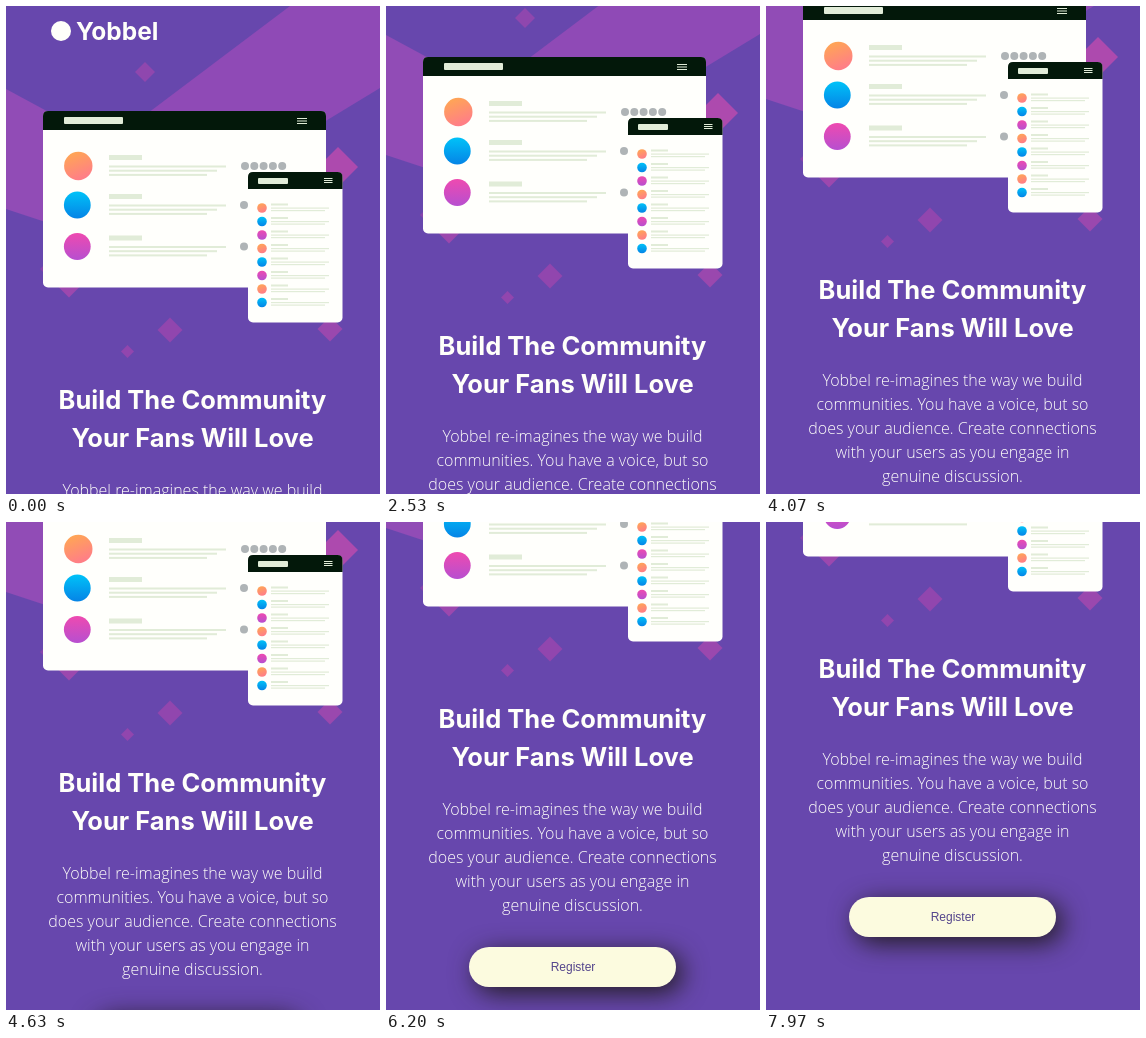
These frames come from a looping animation (374x488 px, 8 s). An HTML page:

```html
<!DOCTYPE html>
<html lang="en">
<head>
<meta charset="utf-8">
<title>Landing page scroll</title>
<style>
  html, body { margin: 0; width: 100%; height: 100%; overflow: hidden; background: #6747ad; }
  svg { display: block; }
  text { fill: #fffffa; }
  .logo { font: 700 24.5px Inter, sans-serif; }
  .heading { font: 700 25.5px Inter, sans-serif; text-anchor: middle; }
  .copy { font: 300 16px "Open Sans", sans-serif; text-anchor: middle; }
  .label { font: 12px "Liberation Sans", Arial, sans-serif; text-anchor: middle; fill: #54458c; }
  .button { fill: #fcfbdf; filter: drop-shadow(6px 6px 13px rgba(30, 25, 24, .95)); }
  .paper { fill: #fffffc; }
  .dark { fill: #03180a; }
  .pale { fill: #e1ecd8; }
  .dot { fill: #afb4b6; }
</style>
</head>
<body>
<svg width="374" height="488" viewBox="0 0 374 488">
  <defs>
    <linearGradient id="orange" x2=".4" y2="1"><stop stop-color="#ffab4e"/><stop offset="1" stop-color="#ff7f86"/></linearGradient>
    <linearGradient id="blue" x2="0" y2="1"><stop stop-color="#00c2f8"/><stop offset="1" stop-color="#0584e6"/></linearGradient>
    <linearGradient id="pink" x2="0" y2="1"><stop stop-color="#ee4ab0"/><stop offset="1" stop-color="#b74fd0"/></linearGradient>
  </defs>
  <g id="page"></g>
</svg>
<script>
const page = document.getElementById('page');
const colors = ['orange', 'blue', 'pink'];

const rect = (cls, x, y, w, h, r = 0) =>
  `<rect class="${cls}" x="${x}" y="${y}" width="${w}" height="${h}" rx="${r}"/>`;
const circle = (fill, x, y, r) => `<circle fill="${fill}" cx="${x}" cy="${y}" r="${r}"/>`;
const text = (cls, x, y, str) => `<text class="${cls}" x="${x}" y="${y}">${str}</text>`;
const diamond = ([x, y, r, fill]) =>
  `<path fill="${fill}" d="M${x} ${y - r}l${r} ${r}l${-r} ${r}l${-r} ${-r}z"/>`;
const lines = (cls, x, y, step, str) =>
  str.map((s, i) => text(cls, x, y + i * step, s)).join('');
const menu = (x, y, w, step) => [0, 1, 2].map(i => rect('pale', x, y + i * step, w, 1)).join('');

const frame = (x, y, w, h, head) =>
  rect('paper', x, y, w, h, 5) +
  `<path class="dark" d="M${x} ${y + head}v${5 - head}q0 -5 5 -5h${w - 10}q5 0 5 5v${head - 5}z"/>`;

const largeRow = (y, i) =>
  circle(`url(#${colors[i]})`, i ? 71.3 : 72.3, y, i ? 13.4 : 14.2) +
  rect('pale', 103, y - 11, 33, 5) +
  [117, 108, 98].map((w, k) => rect('pale', 103, y - .5 + k * 4.2, w, 2)).join('') +
  [0, 1, 2, 3, 4].slice(0, i ? 1 : 5)
    .map(k => `<circle class="dot" cx="${(i ? 238 : 239) + k * 9.3}" cy="${y}" r="4"/>`).join('');

const smallRow = i => {
  const y = 202 + i * 13.5;
  return circle(`url(#${colors[i % 3]})`, 256, y, 4.8) +
    rect('pale', 265, y - 4.5, 17, 2) +
    rect('pale', 265, y - .5, 58, 1.2) + rect('pale', 265, y + 2, 54, 1.2);
};

page.innerHTML =
  '<path fill="#8f4ab6" d="M284 0H374V82L318 116H130z"/>' +
  '<path fill="#914cb6" d="M0 83L100 137V236L0 203z"/>' +
  [[139, 66, 10, '#8f47ae'], [332, 161, 20, '#ad4aae'], [164, 324, 12.5, '#9146ae'],
   [324, 323, 12.5, '#9a48ae'], [121.5, 345.5, 6.5, '#9146ae'], [63, 277, 14.5, '#9c48ae'],
   [39, 263, 5, '#8745ac']].map(diamond).join('') +
  circle('#fffffa', 55, 25, 10) +
  text('logo', 70, 34, 'Yobbel') +
  frame(37, 105, 283, 176.5, 19) +
  rect('pale', 58, 111, 59, 7, 1) + menu(291, 112, 10, 2.5) +
  [160, 199, 240.5].map(largeRow).join('') +
  frame(242, 166, 94.5, 150.5, 17) +
  rect('pale', 252, 172, 30, 6, 1) + menu(318, 172, 8.5, 2) +
  Array.from({ length: 8 }, (_, i) => smallRow(i)).join('') +
  lines('heading', 186.5, 403, 38, ['Build The Community', 'Your Fans Will Love']) +
  lines('copy', 186.5, 490, 24, [
    'Yobbel re-imagines the way we build',
    'communities. You have a voice, but so',
    'does your audience. Create connections',
    'with your users as you engage in',
    'genuine discussion.']) +
  rect('button', 83, 622, 207, 40, 20) +
  text('label', 187, 646, 'Register');

// Scroll keys: time in s, offset in px, speed in px/s
const keys = [[0, 0, 12], [2.53, 54, 28], [3.4, 83, 38], [4.63, 133, 40],
              [5.47, 166, 40], [6.87, 223, 36], [7.97, 247, 8], [8, 247, 0]];

function scrollAt(t) {
  const i = keys.findIndex(k => t < k[0]);
  const [t0, y0, v0] = keys[i - 1], [t1, y1, v1] = keys[i];
  const d = t1 - t0, u = (t - t0) / d, w = 1 - u;
  return y0 * w * w * (1 + 2 * u) + v0 * d * u * w * w +
         y1 * u * u * (1 + 2 * w) - v1 * d * u * u * w;
}

const start = performance.now();
function draw() {
  const t = (performance.now() - start) / 1000 % 8;
  page.setAttribute('transform', `translate(0 ${-Math.round(scrollAt(t))})`);
  requestAnimationFrame(draw);
}
draw();
</script>
</body>
</html>
```
